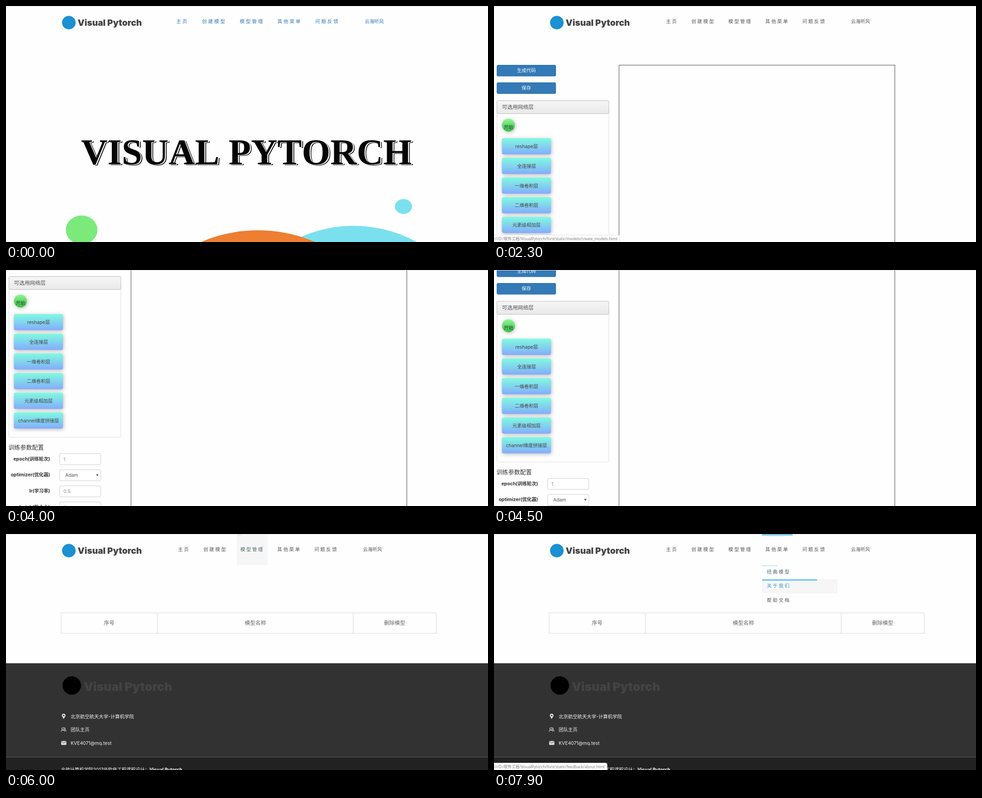
Write an HTML page that moves like this. It is 1066 px wide and 525 px high and loops after 8000 ms.

```html
<!DOCTYPE html>
<html lang="zh">
<head>
<meta charset="utf-8">
<title>Visual Pytorch</title>
<style>
html, body { margin: 0; width: 100%; height: 100%; overflow: hidden; background: #fefefe; }
svg { display: block; width: 1066px; height: 525px; }
text { font: 10.4px Inter, "Noto Sans CJK SC", "Noto Sans CJK", sans-serif; dominant-baseline: central; white-space: pre; }
.mid { text-anchor: middle; }
.end { text-anchor: end; font-weight: 700; }
.brand { font-weight: 900; }
.title text { font: 700 81px "Liberation Serif", "Noto Serif", serif; font-kerning: none; dominant-baseline: alphabetic; }
.status { font-family: "Open Sans", "Noto Sans CJK SC", "Noto Sans CJK", sans-serif; }
.raised { filter: drop-shadow(1px 2px 4px rgba(0, 0, 0, .27)); }
.field { fill: #fff; stroke: #ccc; }
</style>
</head>
<body>
<svg viewBox="0 0 1066 525">
  <defs>
    <linearGradient id="aqua" x2="0" y2="1"><stop stop-color="#7ffbe0"/><stop offset="1" stop-color="#84acfc"/></linearGradient>
    <linearGradient id="green" x2="0" y2="1"><stop stop-color="#92f792"/><stop offset="1" stop-color="#30c244"/></linearGradient>
    <linearGradient id="grey" x2="0" y2="1"><stop stop-color="#f6f6f6"/><stop offset="1" stop-color="#e9e9e9"/></linearGradient>
  </defs>
  <rect width="1066" height="525" fill="#fefefe"/>

  <g id="home">
    <g class="title">
      <text x="170" y="354" fill="#111">VISUAL PYTORCH</text>
      <text x="168.3" y="353" fill="#fefefe">VISUAL PYTORCH</text>
      <text x="166" y="351.5" fill="#050505">VISUAL PYTORCH</text>
    </g>
    <ellipse cx="167.3" cy="498" rx="35" ry="32" fill="#7bea7b"/>
    <ellipse cx="879" cy="446" rx="19" ry="16.4" fill="#7be0ee"/>
    <ellipse cx="769" cy="733" rx="266" ry="244" fill="#7be0ee"/>
    <ellipse cx="557.5" cy="768.6" rx="294" ry="269.6" fill="#ee7e32"/>
  </g>

  <g id="create">
    <rect x="276.5" y="131.5" width="610" height="800" fill="none" stroke="#444"/>
    <rect x="6.5" y="225" width="247.5" height="343" rx="3" fill="none" stroke="#ddd"/>
    <rect x="6.5" y="210.5" width="247.5" height="29" rx="2" fill="url(#grey)" stroke="#b9b9b9"/>
    <circle class="raised" cx="32" cy="265" r="14.3" fill="url(#green)"/>
  </g>

  <g id="manage">
    <path d="M122 175.5H951.5V221H122ZM334.5 175.5V221M768 175.5V221" fill="none" stroke="#d8d8d8"/>
    <rect y="287.5" width="1066" height="209" fill="#323232"/>
    <rect y="496.5" width="1066" height="29" fill="#222"/>
    <circle cx="145.5" cy="337" r="20.5"/>
    <path d="M127.5 411.5C125 407.500 123.500 406 123.500 403.800A4 4 0 0 1 131.500 403.800C131.500 406 130 407.500 127.500 411.500ZM127.500 402.300A1.600 1.600 0 1 0 127.510 402.300Z" fill="#ddd" fill-rule="evenodd"/>
    <g fill="none" stroke="#ddd" stroke-width="1.100">
      <circle cx="126" cy="433.300" r="2.600"/>
      <path d="M122 439.800C122.300 435 129.700 435 130 439.800M129 430.900A2.500 2.500 0 0 1 130 435.600Q132.800 436.500 133 439"/>
    </g>
    <rect x="122" y="460.500" width="11.500" height="8.800" rx="1" fill="#ddd"/>
    <path d="M122.500 461.500L127.750 465.500L133 461.500" fill="none" stroke="#323232"/>
  </g>

  <rect id="edge" width="1066" height="1" fill="#e4e4e4"/>
  <g id="bubble">
    <rect x="-4" y="509.500" height="20" rx="3" fill="#fdfdfd" stroke="#e2e2e2"/>
    <text class="status" x="-1.500" y="518" fill="#777" style="font-size:8.600px"></text>
  </g>
</svg>
<script>
const LOOP = 8000, STEP = 100, HOVER = 500;
const BLUE = [51, 122, 183], DARK = [85, 85, 85], ACCENT = [56, 176, 232];
const $ = id => document.getElementById(id);
const links = [];

function add(parent, tag, attrs, text) {
  const node = document.createElementNS('http://www.w3.org/2000/svg', tag);
  for (const k in attrs) node.setAttribute(k, attrs[k]);
  if (text) node.textContent = text;
  return parent.appendChild(node);
}
const label = (p, x, y, s, size = 10.4, fill = '#444', cls = '') =>
  add(p, 'text', { x, y, fill, class: cls, style: `font-size:${size}px` }, s);
const box = (p, x, y, width, height, attrs) => add(p, 'rect', { x, y, width, height, ...attrs });
const mix = (a, b, v) => `rgb(${a.map((c, i) => Math.round(c + (b[i] - c) * v))})`;
const rgb = c => mix(c, c, 0);

// hover: [enter, leave, bar leaves]
function link(p, x, y, w, h, tx, cy, s, home, hover) {
  const back = box(p, x, y, w, h, { fill: '#f6f6f6' });
  const bar = box(p, x, y, 0, 3, { fill: rgb(ACCENT) });
  const color = home ? BLUE : DARK;
  const text = label(p, tx - .5, cy, s, 10.5, rgb(color));
  text.style.letterSpacing = (home ? 3 : 2.6) + 'px';
  const line = home && box(p, tx, 38, w - 18, 1, { fill: '#23527c' });
  links.push({ back, bar, text, line, color, w, home, hover });
}

function header(p, home, hovers) {
  add(p, 'circle', { cx: 139, cy: 37, r: 15, fill: '#1b90d2' });
  label(p, 158.5, 37.300, 'Visual Pytorch', 19.2, '#444', 'brand');
  ['主页', '创建模型', '模型管理', '其他菜单', '问题反馈'].forEach((s, i) => {
    const x = home ? (i ? 434 + 83.4 * (i - 1) : 377) : (i ? 437 + 81.8 * (i - 1) : 381);
    link(p, x - 8, 0, i ? 68 : 42.5, 69, x, 34, s, home, hovers[i]);
  });
  label(p, home ? 793.5 : 789.5, 34, '云海听风', 10.5, rgb(home ? BLUE : DARK));
}

const home = $('home'), create = $('create'), manage = $('manage');
header(home, true, { 0: [1160, 1750], 1: [1750, 9e3], 3: [200, 300] });
header(create, false, { 1: [2740, 2850], 2: [5060, 9e3] });

// model builder
[['生成代码', 131.5], ['保存', 170.5]].forEach(([s, y]) => {
  box(create, 6.5, y, 130, 24.5, { rx: 2.5, fill: '#337ab7', stroke: '#2e6da4' });
  label(create, 71.5, y + 12, s, 10.4, '#fff', 'mid');
});
label(create, 17.5, 225, '可选用网络层', 11.7, '#555');
label(create, 32.3, 269, '开始', 10.5, '#333', 'mid');
['reshape层', '全连接层', '一维卷积层', '二维卷积层', '元素级相加层', 'channel维度拼接层'].forEach((s, i) => {
  const y = 294 + 43.75 * i;
  box(create, 17.5, y, 108.5, 36, { rx: 4, fill: 'url(#aqua)', class: 'raised' });
  label(create, 72, y + 18.700, s, 10.4, '#444', 'mid');
});
label(create, 5.5, 589.5, '训练参数配置', 13, '#333');
[['epoch(训练轮次)', '1'], ['optimizer(优化器)', 'Adam'], ['lr(学习率)', '0.5'], ['batch(批大小)', '1']].forEach(([s, v], i) => {
  const y = 604.5 + 35.8 * i, pick = i === 1;
  label(create, 97.5, y + 11.5, s, 10.4, '#333', 'end');
  box(create, 118.5, y, 91, 24.5, { rx: 2.5, class: 'field' });
  label(create, pick ? 131 : 127, y + 12.5, v, 10.4, pick ? '#555' : '#888');
  if (pick) add(create, 'path', { d: `M199.500 ${y + 10}h5l-2.500 4.500z`, fill: '#444' });
});

// model list
[['序号', 228], ['模型名称', 551.5], ['删除模型', 859.5]].forEach(([s, x]) => label(manage, x, 198, s, 11.8, '#666', 'mid'));
label(manage, 172, 338.500, 'Visual Pytorch', 26.4, '#434343', 'brand');
['北京航空航天大学-计算机学院', '团队主页', 'KVE4071@mq.test'].forEach((s, i) =>
  label(manage, 143, 406 + 29.7 * i, s, 10.4, '#f4f4f4'));
const credit = label(manage, 121.5, 523.5, '北航计算机学院2017级软件工程课程设计：', 10.2, '#fff');
add(credit, 'tspan', { 'font-weight': 700 }, 'Visual Pytorch');

header(manage, false, { 2: [5925, 6310], 3: [6990, 7285, 9e3] });
const menu = add(manage, 'g', {});
box(menu, 593, 69, 167, 95, { fill: '#fefefe' });
const menuHovers = [[7285, 7665], [7683, 9e3]];
['经典模型', '关于我们', '帮助文档'].forEach((s, i) =>
  link(menu, 593, 69 + 31.75 * i, 167, 31.5, 604, 84 + 31.7 * i, s, false, menuHovers[i]));

// CSS "ease" curve
function ease(x) {
  if (x <= 0) return 0;
  if (x >= 1) return 1;
  let lo = 0, hi = 1, s;
  for (let i = 0; i < 24; i++) {
    s = (lo + hi) / 2;
    const px = .75 * s * (1 - s) + s ** 3;
    if (px < x) lo = s; else hi = s;
  }
  return .3 * s * (1 - s) ** 2 + 3 * s * s * (1 - s) + s ** 3;
}

// Leaving early runs back in a proportionally shorter time.
function hoverAt(t, on, off) {
  const rise = ease((Math.min(t, off) - on) / HOVER);
  return t <= off || !rise ? rise : rise * (1 - ease((t - off) / (HOVER * rise)));
}

const scrolls = [[0, 0], [3200, 4], [3300, 58], [3400, 73], [3700, 118], [3800, 146],
  [4000, 196], [4100, 219], [4400, 208], [4500, 141], [4600, 0]];
const statuses = [[0, '', 0], [1200, 'home/index', .6], [1300, 'home/index', 1], [1800, 'models/create_models', 1],
  [2400, 'models/create_models', .35], [2500, '', 0], [5200, 'models/manage_models', 1],
  [5600, 'models/manage_models', .3], [5700, '', 0], [7300, 'models/classic_models', 1], [7700, 'feedback/about', 1]];
const last = (list, t) => list.filter(e => e[0] <= t).pop();
const [bubbleBox, bubbleText] = $('bubble').children;

function draw(t) {
  const page = t < 2300 ? home : t < 5700 ? create : manage;
  for (const p of [home, create, manage]) p.style.display = p === page ? '' : 'none';
  create.setAttribute('transform', `translate(0 ${-last(scrolls, t)[1]})`);

  for (const l of links) {
    const [on, off, barOff = off] = l.hover || [9e3, 9e3];
    const time = l.home ? Math.min(t, 2100) : t;
    const v = hoverAt(time, on, barOff), over = time >= on && time < off;
    l.back.style.opacity = over ? 1 : 0;
    l.bar.setAttribute('width', l.w * v);
    l.bar.style.opacity = v;
    l.text.setAttribute('fill', mix(l.color, ACCENT, hoverAt(time, on, off)));
    if (l.line) l.line.style.opacity = over ? 1 : 0;
  }

  const open = ease((t - 6980) / 350);
  menu.style.opacity = open;
  menu.setAttribute('transform', `translate(0 ${-9 * (1 - open)})`);

  const [, path, alpha] = last(statuses, t);
  $('bubble').style.opacity = alpha;
  if (path) {
    bubbleText.textContent = `:///D:/软件工程/VisualPytorch/font/static/${path}.html`;
    bubbleBox.setAttribute('width', bubbleText.getComputedTextLength() + 8);
  }
}

function tick() {
  const t = performance.now() % LOOP;
  draw(Math.floor(t / STEP) * STEP);
  requestAnimationFrame(tick);
}
tick();
</script>
</body>
</html>
```
